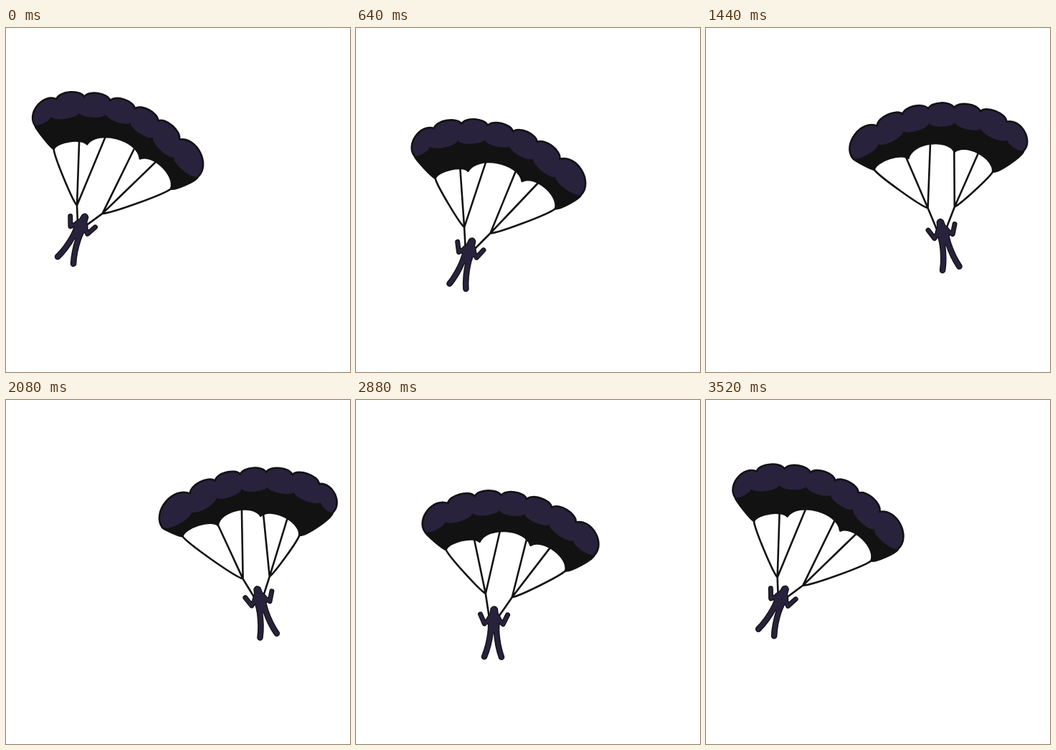
Write an HTML page that moves like this. It is 480x480 px and loops after 3.6 s.

```html
<!DOCTYPE html>
<html lang="en">
<head>
<meta charset="utf-8">
<title>Parachute</title>
<style>
  html, body { margin: 0; width: 100%; height: 100%; overflow: hidden; background: #fff; }
  svg { display: block; width: 100vw; height: 100vh; }
  path { stroke-linecap: round; stroke-linejoin: round; }
  .line { fill: none; stroke: #121214; stroke-width: 2.6px; }
  .rim { --rim: 2.6px; fill: #121214; stroke: #121214; }
  .skin { --rim: 0px; fill: #28223c; stroke: #28223c; }
  .torso { stroke-width: calc(2px + var(--rim)); }
  .arms { fill: none; stroke-width: calc(4.4px + var(--rim)); }
  .legs { fill: none; stroke-width: calc(6px + var(--rim)); }
</style>
</head>
<body>
<svg viewBox="0 0 480 480">
  <defs>
    <g id="body">
      <path class="arms" d="M-6 0L-13 7L-19 -6M6 0L13 7L19 -6"/>
      <path class="legs" d="M-4 17Q-6 38 -12 53M4 17Q6 38 12 53"/>
      <path class="torso" d="M-3 -14Q0 -18 3 -14L4 -7L8 -1L6 9L6 18H-6L-6 9L-8 -1L-4 -7Z"/>
    </g>
  </defs>
  <g id="chute">
    <path id="cords" class="line"/>
    <path id="under" fill="#121212"/>
    <path id="cover" fill="#28223c"/>
    <path id="edge" class="line"/>
    <g id="man">
      <use href="#body" class="rim"/>
      <use href="#body" class="skin"/>
    </g>
  </g>
</svg>
<script>
const LOOP = 3600, STEP = 80, SPAN = 239, LOBES = 7;
const $ = id => document.getElementById(id);

// Time, centre x and y, tilt, yaw, cord length, lean of the body.
const keys = [
  [0, 154, 171.5, 17.6, -1, .373, 24],
  [640, 198, 205.5, 13, -1, .34, 17.6],
  [880, 231, 216, 8, -.1, .31, 3],
  [1120, 268, 207, 1.9, .9, .27, -13.5],
  [1440, 324, 176.5, -2.5, .4, .31, -13],
  [2080, 337, 167.5, -5, .9, .34, -13.5],
  [2880, 214.5, 200, 7.7, -.35, .31, 1.5],
  [3360, 157, 173, 17, -.95, .365, 21]
];

function keyAt(i) {
  const n = keys.length, [t, ...v] = keys[(i + n) % n];
  return { t: t + Math.floor(i / n) * LOOP, v };
}

// Smooth cyclic motion that never overshoots a key.
function stateAt(t) {
  let i = keys.length - 1;
  while (keys[i][0] > t) i--;
  const [p, a, b, n] = [-1, 0, 1, 2].map(d => keyAt(i + d));
  const h = b.t - a.t, u = (t - a.t) / h, w = 1 - u;
  const slope = (k, l, j) => (l.v[j] - k.v[j]) / (l.t - k.t);
  const blend = (r, s) => r * s > 0 ? 2 * r * s / (r + s) : 0;
  return a.v.map((y, j) => {
    const s = slope(a, b, j);
    const ma = blend(slope(p, a, j), s), mb = blend(s, slope(b, n, j));
    return y * w * w * (1 + 2 * u) + b.v[j] * u * u * (3 - 2 * u)
      + h * u * w * (ma * w - mb * u);
  });
}

// Canopy coordinates: u runs along the chord from 0 to 1, v points up.
const at = (u, v) => [(u - .5) * SPAN, -v * SPAN];
const xy = p => p[0].toFixed(2) + ' ' + p[1].toFixed(2);

// Curve from a to b that swells to the left of its direction.
function bow(a, b, k) {
  const dx = b[0] - a[0], dy = b[1] - a[1], o = k * 4 / 3;
  const c = [a[0] + dx * .12 + dy * o, a[1] + dy * .12 - dx * o];
  const d = [b[0] - dx * .12 + dy * o, b[1] - dy * .12 - dx * o];
  return `C${xy(c)} ${xy(d)} ${xy(b)}`;
}

const chain = (ps, k) => ps.slice(1).map((p, i) => bow(ps[i], p, k(i))).join('');
const cord = (a, b, k = 0) => 'M' + xy(a) + bow(a, b, k);

// Points where the lobes meet, on an arch of the given height.
function arch(yaw, height) {
  return Array.from({ length: LOBES + 1 }, (_, i) => {
    if (i % LOBES === 0) return at(i / LOBES, 0);
    const u = .13 + .151 * (i - 1);
    return at(u + .055 * yaw, height(u));
  });
}

function draw(t) {
  const [x, y, tilt, yaw, drop, lean] = stateAt(t);
  const top = arch(yaw, u => .272 * Math.sqrt(1 - (2 * u - 1) ** 2));
  const seam = arch(yaw, u => .188 * Math.sin(Math.PI * u));
  const hem = [
    at(.13 - .018 * yaw, -.08 + .02 * yaw),
    at(.325, -.015),
    at(.61 - .035 * yaw, .008 + .01 * yaw),
    at(.83 - .04 * yaw, -.115)
  ];

  const crown = 'M' + xy(top[0]) + chain(top, i => i % (LOBES - 1) ? .21 : .31);
  const hull = crown + bow(top[LOBES], hem[3], .08)
    + chain(hem.slice().reverse(), i => [-.23, -.245, -.16][i])
    + bow(hem[0], top[0], .04) + 'Z';
  $('under').setAttribute('d', hull);
  $('edge').setAttribute('d', hull);
  $('cover').setAttribute('d', crown + chain(seam.reverse(), () => .14) + 'Z');

  const chest = at(.485 + .05 * yaw, -.31 - .45 * drop);
  const turn = (lean - tilt) * Math.PI / 180, c = Math.cos(turn), s = Math.sin(turn);
  const shoulder = side => [chest[0] + 7 * side * c + 4 * s, chest[1] + 7 * side * s - 4 * c];
  const left = at(.412 + .035 * yaw, -drop), right = at(.568 + .035 * yaw, -drop);
  $('cords').setAttribute('d', [
    cord(hem[0], left, -.03),
    cord(at(.295 + .025 * yaw, .01), left),
    cord(at(.445 + .03 * yaw, .07), left),
    cord(right, at(.595, .04)),
    cord(right, at(.745, .02)),
    cord(right, hem[3], -.03),
    cord(left, shoulder(-1)),
    cord(right, shoulder(1))
  ].join(''));

  $('chute').setAttribute('transform', `translate(${x} ${y}) rotate(${tilt})`);
  $('man').setAttribute('transform', `translate(${chest}) rotate(${lean - tilt})`);
}

function frame() {
  const t = performance.now() % LOOP;
  draw(Math.floor(t / STEP) * STEP);
  requestAnimationFrame(frame);
}
frame();
</script>
</body>
</html>
```
